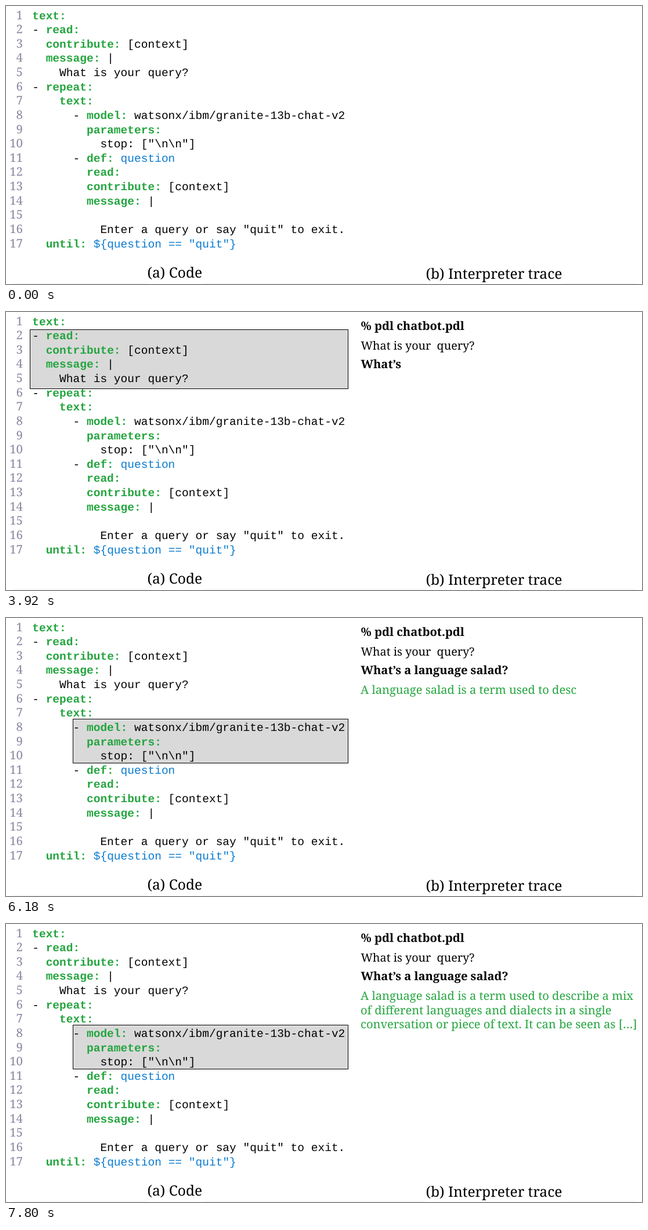
These frames come from a looping animation (1096 by 480 pixels, 8 s). An HTML page:

```html
<!DOCTYPE html>
<html lang="en">
<head>
<meta charset="utf-8">
<title>Code and interpreter trace</title>
<style>
  html, body { margin: 0; width: 100%; height: 100%; overflow: hidden; background: #fff; }
  svg { display: block; width: 1096px; height: 480px; }
  text { white-space: pre; text-rendering: geometricPrecision; }
  .code { font: 19.55px "Liberation Mono", "Noto Sans Mono", monospace; }
  .num, .trace, .caption { font-family: "Noto Serif", "Liberation Serif", serif; }
  .num { font-size: 20.4px; fill: #8886a0; text-anchor: end; }
  .trace { font-size: 19.7px; }
  .input { font-size: 20.1px; font-weight: 700; }
  .reply { font-size: 20.12px; fill: #24a53f; }
  .caption { font-size: 24.55px; }
  .key { font-weight: 700; fill: #24a53f; }
  .value { fill: #0a7bd0; }
  .mark { fill: #d9d9d9; stroke: #000; stroke-width: 1; }
</style>
</head>
<body>
<svg id="stage" viewBox="0 0 1096 480"></svg>
<script>
const LOOP = 8000, STEP = 60;

// Each row: indent and dash, key, plain text, blue text
const CODE = [
  ['', 'text:'],
  ['- ', 'read:'],
  ['  ', 'contribute:', ' [context]'],
  ['  ', 'message:', ' |'],
  ['    ', '', 'What is your query?'],
  ['- ', 'repeat:'],
  ['    ', 'text:'],
  ['      - ', 'model:', ' watsonx/ibm/granite-13b-chat-v2'],
  ['        ', 'parameters:'],
  ['          ', '', 'stop: ["\\n\\n"]'],
  ['      - ', 'def:', ' ', 'question'],
  ['        ', 'read:'],
  ['        ', 'contribute:', ' [context]'],
  ['        ', 'message:', ' |'],
  [''],
  ['          ', '', 'Enter a query or say "quit" to exit.'],
  ['  ', 'until:', ' ', '${question == "quit"}'],
];

const COMMAND = [...'% pdl chatbot.pdl'];
const QUERY = [...'What’s a language salad?'];
// The closing bracket group appears as one piece
const REPLY = [
  [...'A language salad is a term used to describe a mix '],
  [...'of different languages and dialects in a single '],
  [...'conversation or piece of text. It can be seen as ', '[…]'],
];

const text = (cls, x, y, body = '', id = '') =>
  `<text class="${cls}" x="${x}" y="${y}" id="${id}">${body}</text>`;
const span = (cls, body = '') => body && `<tspan class="${cls}">${body}</tspan>`;
const mark = (id, x, y, w, h) =>
  `<rect class="mark" id="${id}" x="${x}" y="${y}" width="${w}" height="${h}"/>`;
const rule = (x1, x2) =>
  `<rect x="${x1}" y="478.5" width="${x2 - x1}" height="1.5" fill="#f6f6f6"/>`;

const rows = CODE.map(([lead, key, plain = '', blue], i) => {
  const y = 22.6 + i * 24.62;
  return text('num', 29, y, i + 1) +
    text('code', 45.2, y, lead + span('key', key) + plain + span('value', blue));
});

document.getElementById('stage').innerHTML = [
  rule(12, 244), rule(338, 724), rule(957, 1085),
  mark('readMark', 41.5, 30.5, 548, 102),
  mark('modelMark', 115.5, 174.5, 474, 76),
  ...rows,
  text('caption', 243.5, 468.5, '(a) Code'),
  text('caption', 723.5, 470.5, '(b) Interpreter trace'),
  text('trace input', 611.5, 31.3, '', 'command'),
  text('trace', 611.5, 64.8, 'What is your  query?', 'prompt'),
  text('trace input', 611.5, 97.4, '', 'query'),
  ...REPLY.map((_, i) => text('trace reply', 611, 130.8 + i * 24.8, '', 'reply' + i)),
].join('');

const get = id => document.getElementById(id);
const show = (id, on) => { get(id).style.display = on ? '' : 'none'; };
const type = (id, chars, n) => {
  const shown = chars.slice(0, Math.max(0, n)).join('');
  if (get(id).textContent !== shown) get(id).textContent = shown;
};

// Characters typed at time t: a first batch, then a fixed rate per step
function typed(t, start, first, rate) {
  return t < start ? 0 : Math.floor(first + rate * Math.floor((t - start) / STEP));
}

function draw(t) {
  show('readMark', t >= 2670 && t < 5640);
  show('modelMark', t >= 5640);
  show('prompt', t >= 2670);
  type('command', COMMAND, typed(t, 1070, 2.5, 1.5));
  type('query', QUERY, typed(t, 3740, 2.5, 1.5));
  let n = typed(t, 5640, 3.5, 4.03);
  REPLY.forEach((line, i) => {
    type('reply' + i, line, n);
    n -= line.length;
  });
}

const begin = performance.now();
function tick() {
  draw((performance.now() - begin) % LOOP);
  requestAnimationFrame(tick);
}
tick();
</script>
</body>
</html>
```
